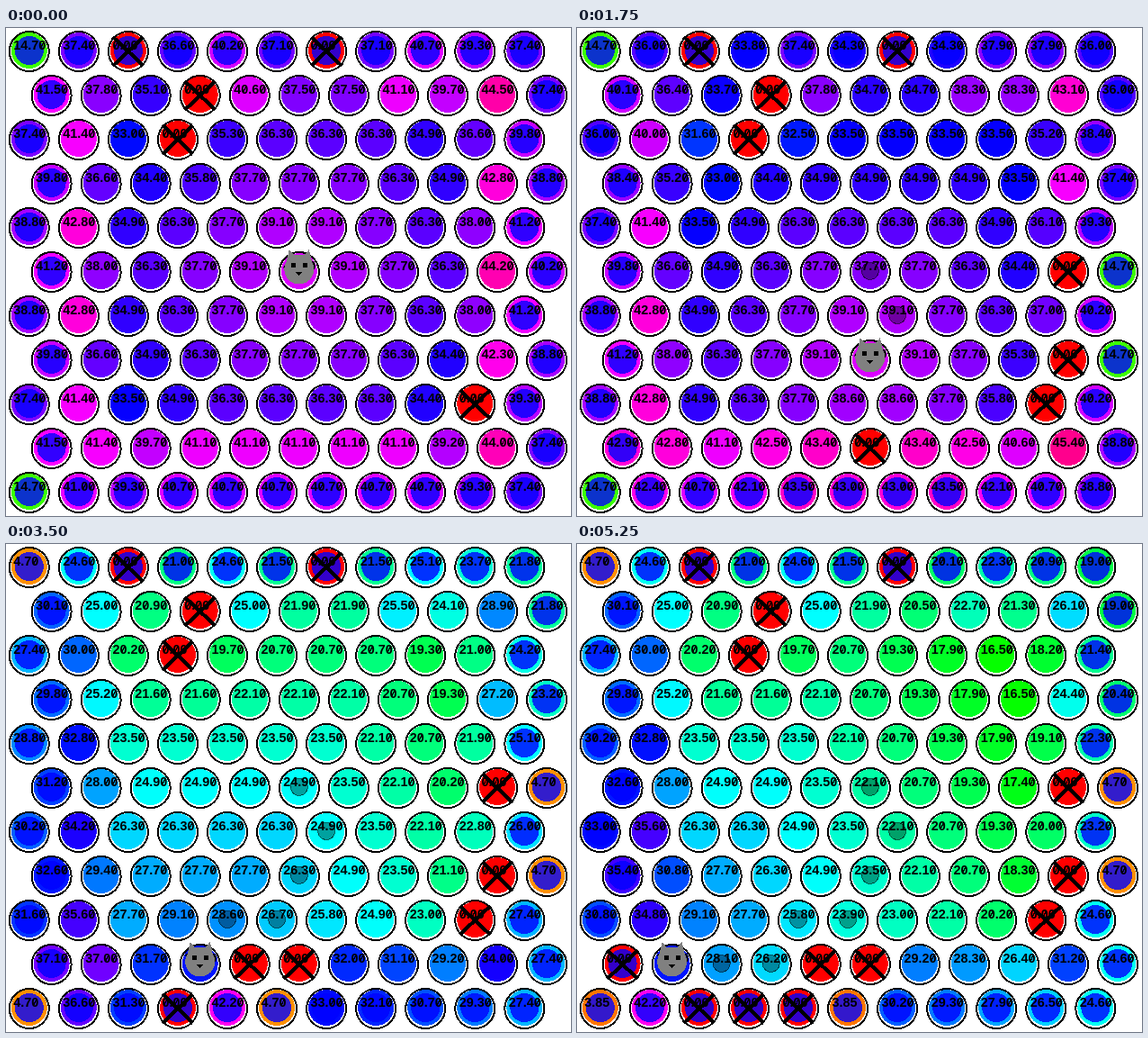
An HTML page for the animation above (5600 ms loop, 628 by 542 pixels).

```html
<!DOCTYPE html>
<html lang="en">
<head>
<meta charset="utf-8">
<title>Cat on a hex board</title>
<style>
html, body { margin: 0; width: 100%; height: 100%; overflow: hidden; background: #fff; }
svg { display: block; }
text { font: bold 14.4px "Liberation Sans", Arial, sans-serif; }
circle, path { shape-rendering: crispEdges; }
</style>
</head>
<body>
<svg id="stage" width="628" height="542" viewBox="0 0 628 542"></svg>
<script>
const SIZE = 11, TICK = 350, TICKS = 16;
const stage = document.getElementById('stage');

// Cells as "row,col"; a wall falls on odd ticks, the cat steps on even ones.
const fixed = ['0,2', '0,6', '1,3', '2,3', '8,9'];
const placed = ['5,9', '7,9', '9,5', '9,4', '10,3', '10,4', '10,2', '9,0'];
const catPath = ['5,5', '6,6', '7,5', '8,5', '8,4', '9,3', '9,2', '9,1'];

function wallTick(key) {
  if (fixed.includes(key)) return 0;
  const i = placed.indexOf(key);
  return i < 0 ? Infinity : 2 * i + 1;
}

function make(tag, attrs, parent) {
  const el = document.createElementNS('http://www.w3.org/2000/svg', tag);
  for (const k in attrs) el.setAttribute(k, attrs[k]);
  return parent.appendChild(el);
}

const show = (el, on) => el.setAttribute('visibility', on ? 'visible' : 'hidden');
const place = (r, c) => `translate(${25.8 + 55.05 * c + (r % 2) * 24.8} ${26 + 49 * r})`;

function makeCell(r, c) {
  const key = r + ',' + c, edge = r % 10 === 0 || c % 10 === 0;
  const g = make('g', { transform: place(r, c) }, stage);
  const disc = make('circle', { cy: -1, r: 20 }, g);
  if (edge) make('circle', { cy: -1, r: 16, fill: '#00f', 'fill-opacity': 0.8 }, g);
  make('circle', { r: 22, fill: 'none', stroke: '#000', 'stroke-width': 2 }, g);
  const label = make('text', { x: -17.5, y: -2 }, g);
  const slash = make('path', { stroke: '#000', 'stroke-width': 1.3 }, g);
  const trail = make('circle', { cy: -1, r: 9.5, fill: '#000', 'fill-opacity': 0.37,
    stroke: '#000', 'stroke-opacity': 0.6 }, g);
  const cross = make('path', { d: 'M-17-16L17 16M17-16L-17 16',
    stroke: '#000', 'stroke-width': 4.2 }, g);
  return { r, c, edge, disc, label, slash, trail, cross,
    wall: wallTick(key), visit: catPath.indexOf(key) };
}

const cells = [];
for (let r = 0; r < SIZE; r++)
  for (let c = 0; c < SIZE; c++) cells.push(makeCell(r, c));

const cat = make('g', {}, stage);
make('path', { d: 'M-15-8L-11-25L-5-18H5L11-25L15-8Z', fill: '#808080' }, cat);
make('circle', { cy: -3, r: 16.5, fill: '#808080' }, cat);
make('path', { d: 'M-9-10h5v5h-5ZM4-10h5v5h-5ZM-4 0H4L0 4Z' }, cat);

// Steps between two cells; odd rows sit half a cell to the right.
function distance(a, b) {
  const dr = Math.abs(a.r - b.r);
  const dx = Math.abs(a.c + (a.r % 2) / 2 - b.c - (b.r % 2) / 2);
  return dr + Math.max(0, dx - dr / 2);
}

for (const cell of cells) cell.near = cells.filter(other => distance(cell, other) === 1);

const isOpen = (cell, tick) => tick < cell.wall;

// Score: near the cat, next to open exits and with few walls around is best.
function score(cell, home, tick) {
  if (!isOpen(cell, tick)) return 0;
  const free = cell.near.filter(n => isOpen(n, tick));
  const exits = free.filter(n => n.edge).length;
  const threats = home.near.filter(n => n.edge && isOpen(n, tick));
  const urgent = threats.length && !threats.includes(cell) ? 10 : 0;
  const cutOff = cell.edge && exits === free.length;
  if (cutOff) return 13 + 0.85 * exits - urgent;
  return 40.5 - 1.4 * distance(cell, home) + 3.1 * exits
    - 0.5 * (6 - free.length) + (cell.edge ? 2 : 0) - urgent;
}

// Slashes through the zeros: digits are 8 wide, the point 4.
function slashes(text) {
  let x = -17.5, d = '';
  for (const ch of text) {
    if (ch === '0') d += `M${x + 2.6}-4L${x + 5.4}-10`;
    x += ch === '.' ? 4 : 8;
  }
  return d;
}

function draw(tick) {
  const step = Math.floor(tick / 2);
  const home = cells.find(cell => cell.visit === step);
  for (const cell of cells) {
    const value = score(cell, home, tick), text = value.toFixed(2);
    cell.disc.setAttribute('fill', `hsl(${value * 7.2}, 100%, 50%)`);
    cell.label.textContent = text;
    cell.slash.setAttribute('d', slashes(text));
    show(cell.cross, !isOpen(cell, tick));
    show(cell.trail, cell.visit >= 0 && cell.visit < step);
  }
  cat.setAttribute('transform', place(home.r, home.c));
}

let last = -1;
function frame() {
  const tick = Math.floor(performance.now() / TICK) % TICKS;
  if (tick !== last) draw(last = tick);
  requestAnimationFrame(frame);
}
frame();
</script>
</body>
</html>
```
